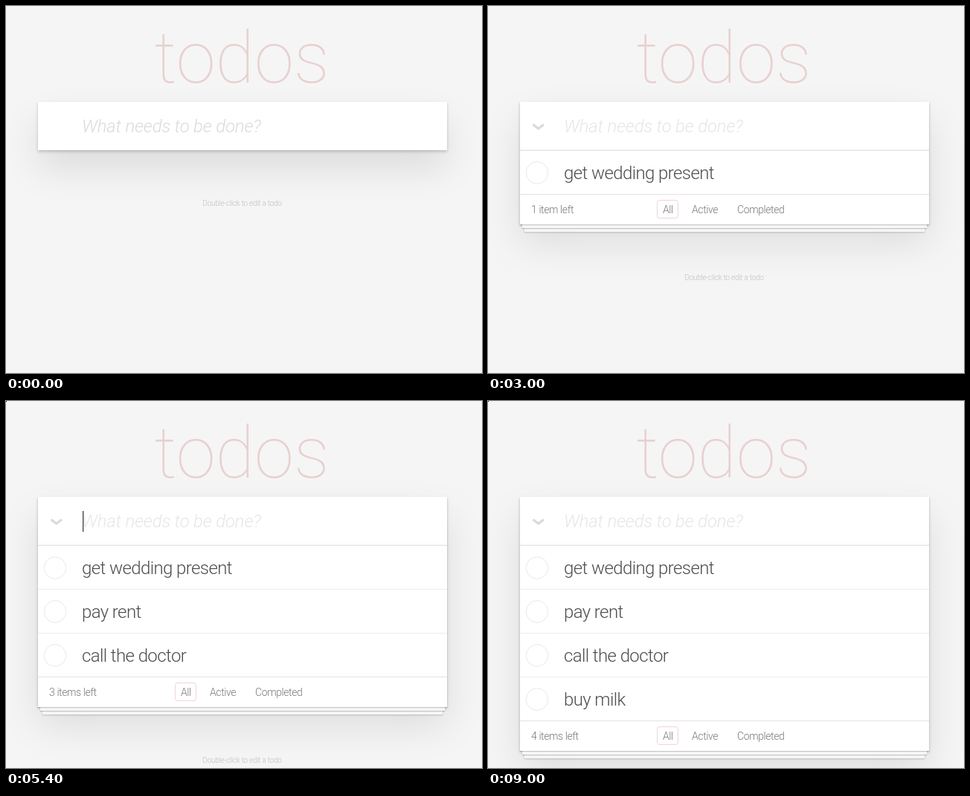
Write an HTML page that moves like this. It is 640 by 494 pixels and loops after 9400 ms.

```html
<!DOCTYPE html>
<html lang="en">
<head>
<meta charset="utf-8">
<title>todos</title>
<style>
html, body { margin: 0; width: 100%; height: 100%; overflow: hidden; background: #f5f5f5; }
#card {
  position: absolute; left: 43px; top: 129px; width: 550px; background: #fff;
  --drop: 0 2px 4px rgba(0,0,0,.2), 0 25px 50px rgba(0,0,0,.1);
  box-shadow: var(--drop);
}
#card.stack {
  box-shadow: 0 1px 1px rgba(0,0,0,.2),
    0 8px 0 -3px #f6f6f6, 0 9px 1px -3px rgba(0,0,0,.2),
    0 16px 0 -6px #f6f6f6, 0 17px 2px -6px rgba(0,0,0,.2), var(--drop);
}
svg { position: absolute; left: 0; top: 0; }
text { font: 300 24px Roboto, "Liberation Sans", sans-serif; white-space: pre; }
.title { font-size: 96px; font-weight: 100; fill: rgba(175,47,47,.18); text-anchor: middle; }
.hint { font-style: italic; letter-spacing: -.2px; }
.item { fill: #4d4d4d; letter-spacing: -.6px; }
.foot { font-size: 14px; fill: #777; letter-spacing: -.4px; }
.info { font-size: 10px; fill: #bfbfbf; letter-spacing: -.25px; text-anchor: middle; }
#caret {
  position: absolute; left: 103px; top: 148px; width: 1px; height: 28px;
  background: #444; box-shadow: 1px 0 #bbb;
}
#dot { position: absolute; left: 0; top: 0; width: 1px; height: 1px; background: #000; }
</style>
</head>
<body>
<div id="card"></div>
<svg id="art" width="640" height="494"></svg>
<div id="caret"></div>
<div id="dot"></div>
<script>
const LOOP = 9400, TICK = 200, ROW = 59, LIST_TOP = 194;
const todos = ["get wedding present", "pay rent", "call the doctor", "buy milk"];
const [card, art, caret, dot] = ["card", "art", "caret", "dot"].map(id => document.getElementById(id));
let shown = -1;

const text = (cls, x, y, str, extra = "") => `<text class="${cls}" x="${x}" y="${y}" ${extra}>${str}</text>`;
const line = (y, color, h = 1) => `<rect x="43" y="${y}" width="550" height="${h}" fill="${color}"/>`;

function footer(n, y) {
  return line(y, "#e3e3e3")
    + text("foot", 58, y + 26, `${n} item${n > 1 ? "s" : ""} left`)
    + `<rect x="227.5" y="${y + 8.5}" width="28" height="24" rx="3" fill="none" stroke="rgba(175,47,47,.2)"/>`
    + text("foot", 235, y + 26, "All")
    + text("foot", 274, y + 26, "Active")
    + text("foot", 335, y + 26, "Completed");
}

function list(n) {
  const rows = todos.slice(0, n).map((todo, i) => {
    const y = LIST_TOP + i * ROW;
    return (i ? line(y, "#ededed") : "")
      + `<circle cx="66" cy="${y + 30.5}" r="14.8" fill="none" stroke="#e9e9e9"/>`
      + text("item", 102, y + 39, todo);
  });
  return line(LIST_TOP - 2, "#f9f9fb", 2) + line(LIST_TOP, "#dfdfe8")
    + `<path d="M60.5 159.5L67.7 165L75 159.5" fill="none" stroke="#dadada" stroke-width="3.2"/>`
    + rows.join("") + footer(n, LIST_TOP + n * ROW);
}

function draw(n) {
  const bottom = LIST_TOP + (n ? n * ROW + 41 : 0);
  card.style.height = bottom - 129 + "px";
  card.className = n ? "stack" : "";
  art.innerHTML = text("title", 317, 102.5, "todos")
    + text("hint", 102, 170, "What needs to be done?", `fill="${n ? "#e6e6e6" : "#dadada"}"`)
    + (n ? list(n) : "")
    + text("info", 317.5, bottom + 74.5, "Double-click to edit a todo");
  dot.hidden = n < 2;
}

function frame(now) {
  const t = Math.floor(now % LOOP / TICK) * TICK;
  const n = Math.floor((t + 600) / 2000); // a todo every two seconds
  if (n !== shown) draw(shown = n);
  caret.hidden = t < 300 || (t - 300) % 1010 >= 500;
  requestAnimationFrame(frame);
}
frame(0);
</script>
</body>
</html>
```
